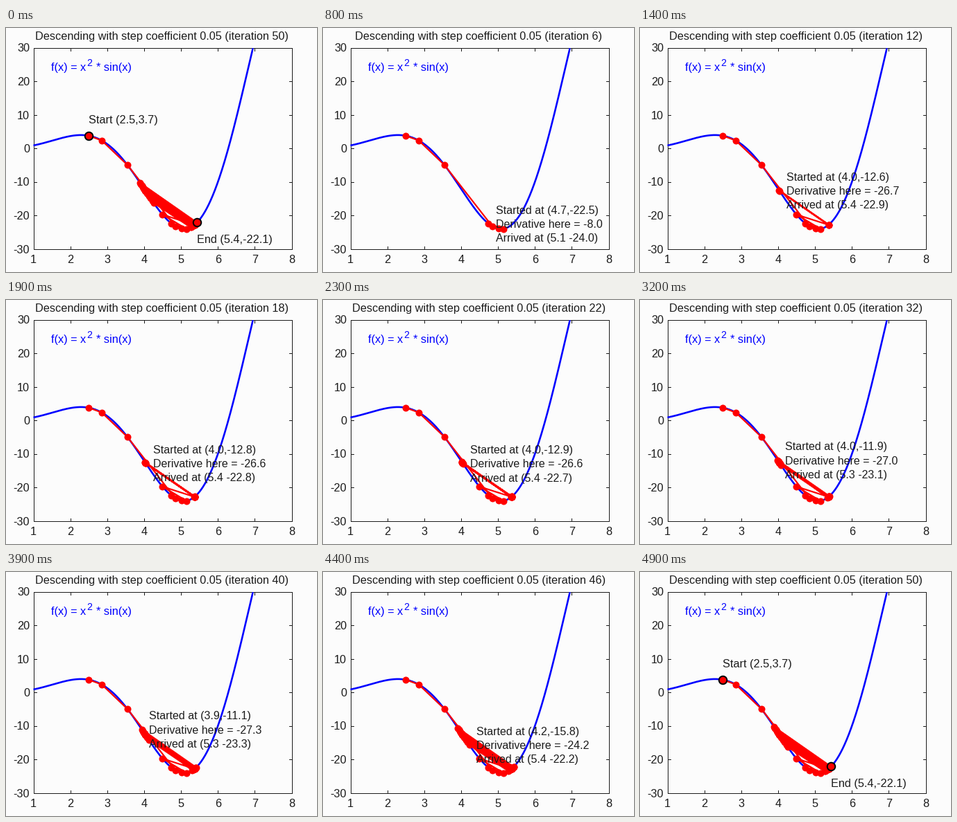
A matplotlib script that plays this animation: 448x353 px, repeating every 5200 ms.

```python
import numpy as np
import matplotlib.pyplot as plt
from matplotlib.animation import FuncAnimation

W, H, DPI = 448, 353, 100
PT = 72 / DPI                    # points per pixel
LEFT, RIGHT, TOP, BOTTOM = 39.5, 411.5, 28.5, 319.5
RATE, STEPS = 0.05, 50
LINE_GAP = 20.2
PAPER, INK = "#fcfcfc", "#1c1c1c"

plt.rcParams["font.family"] = "Liberation Sans"


def f(x):
    return x**2 * np.sin(x)


def slope(x):
    # the cosine term counts double, which makes the descent oscillate
    return 2 * x * np.sin(x) + 2 * x**2 * np.cos(x)


def px(x):
    return LEFT + (x - 1) * (RIGHT - LEFT) / 7


def py(y):
    return TOP + (30 - y) * (BOTTOM - TOP) / 60


def descend(x):
    path = [x]
    for _ in range(STEPS):
        path.append(path[-1] - RATE * slope(path[-1]))
    return np.array(path)


path = descend(2.5)
path_x, path_y = px(path), py(f(path))

fig = plt.figure(figsize=(W / DPI, H / DPI), dpi=DPI, facecolor=PAPER)
ax = fig.add_axes([0, 0, 1, 1])
ax.set_xlim(0, W)
ax.set_ylim(H, 0)
ax.axis("off")


def label(x, y, text="", size=16.2, color=INK, **style):
    """Text with its capitals centred on y."""
    return ax.text(x, y + 5.7, text, fontsize=size * PT, va="baseline",
                   color=color, zorder=6, **style)


def stroke(xs, ys, color, width, **style):
    return ax.plot(xs, ys, color=color, lw=width * PT, **style)[0]


def draw_axes():
    stroke([LEFT, RIGHT, RIGHT, LEFT, LEFT], [TOP, TOP, BOTTOM, BOTTOM, TOP],
           INK, 1, solid_joinstyle="miter")
    for v in range(1, 9):
        x = px(v)
        stroke([x, x], [BOTTOM, BOTTOM - 4], INK, 1)
        stroke([x, x], [TOP, TOP + 4], INK, 1)
        label(x, 334.5, str(v), ha="center")
    for v in range(-30, 31, 10):
        y = py(v)
        stroke([LEFT, LEFT + 4], [y, y], INK, 1)
        stroke([RIGHT, RIGHT - 4], [y, y], INK, 1)
        label(34, y + 0.3, str(v), ha="right")


def draw_curve():
    x = np.linspace(1, 7, 600)
    x = x[f(x) <= 30]
    stroke(px(x), py(f(x)), "blue", 2.6, zorder=3, solid_capstyle="butt")
    label(65, 56.5, "f(x) = x", color="blue")
    label(116.5, 49.5, "2", size=14, color="blue")
    label(129.5, 56.5, "* sin(x)", color="blue")


draw_axes()
draw_curve()
title = label(224.5, 11.5, ha="center")
trail = stroke([], [], "red", 2.2, zorder=4, marker="o", ms=10 * PT, mew=0)
notes = [label(0, 0, size=16) for _ in range(3)]

ends = [
    stroke(path_x[[0, -1]], path_y[[0, -1]], "black", 0, zorder=5, marker="o",
           ms=11.5 * PT, mfc="red", mec="black", mew=2 * PT, ls="none"),
    label(path_x[0], path_y[0] - 24, f"Start ({path[0]:.1f},{f(path[0]):.1f})"),
    label(path_x[-1], path_y[-1] + 24, f"End ({path[-1]:.1f},{f(path[-1]):.1f})"),
]

# (iteration, finished) for each tenth of a second: a few iterations
# are passed over, and the ninth stays twice as long
shown = [n for n in range(1, STEPS + 1)
         if n != 8 and (n < 10 or n % 10 != 5)]
shown.insert(shown.index(9), 9)
timeline = ([(STEPS, True)] * 3 + [(n, False) for n in shown]
            + [(STEPS, True)] * 3)


def update(i):
    n, done = timeline[i]
    title.set_text(f"Descending with step coefficient 0.05 (iteration {n})")
    trail.set_data(path_x[:n + 1], path_y[:n + 1])
    a, b = path[n - 1], path[n]
    lines = (f"Started at ({a:.1f},{f(a):.1f})",
             f"Derivative here = {slope(a):.1f}",
             f"Arrived at ({b:.1f} {f(b):.1f})")
    for k, (note, text) in enumerate(zip(notes, lines)):
        note.set_text(text)
        note.set_position((px(a + 0.2), py(f(a)) + (k - 1) * LINE_GAP + 5.7))
        note.set_visible(not done)
    for part in ends:
        part.set_visible(done)
    return [title, trail, *notes, *ends]


anim = FuncAnimation(fig, update, frames=len(timeline), interval=100,
                     repeat=True, repeat_delay=0)
plt.show()
```
